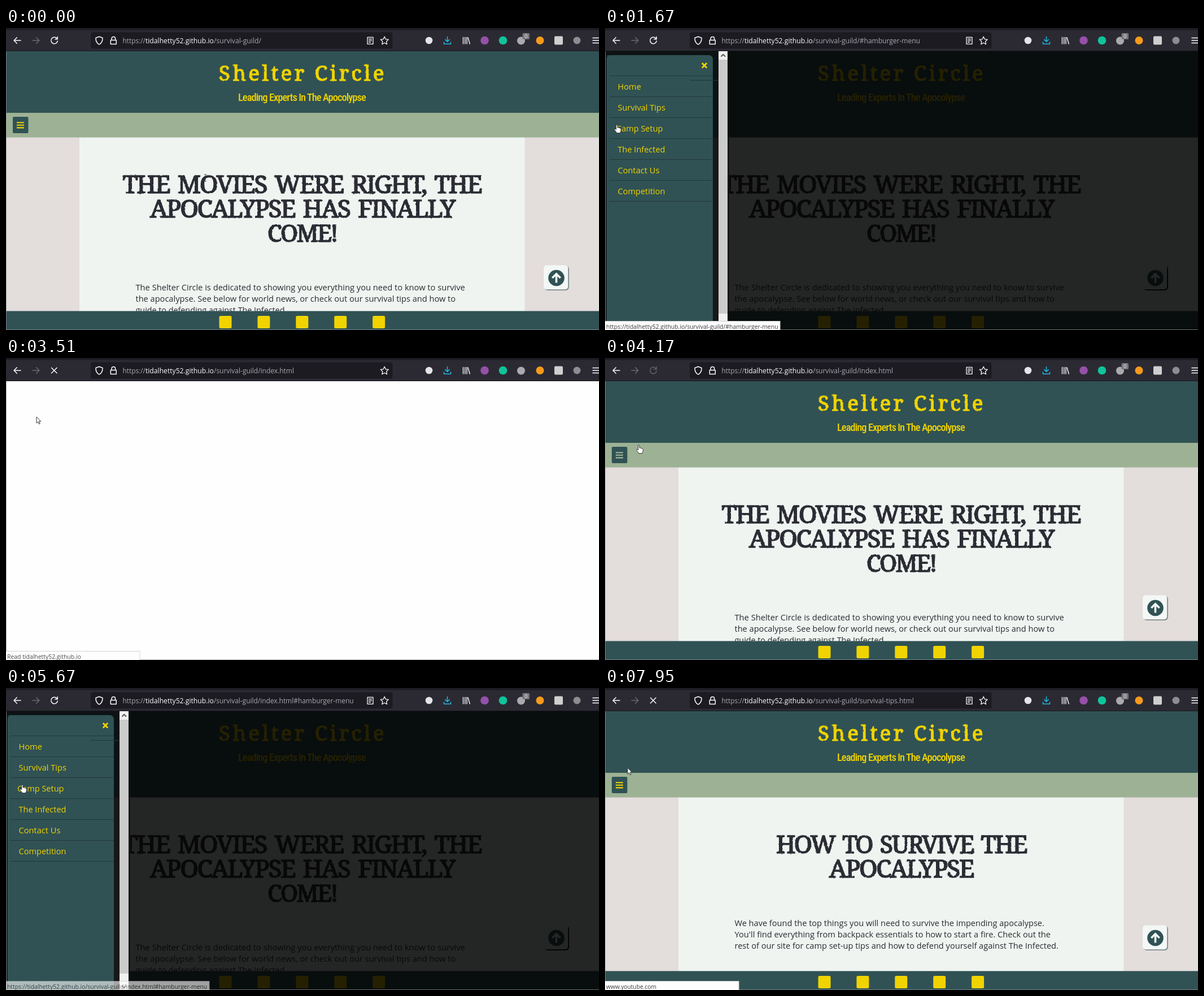
An HTML page that plays this animation: 1050x534 px, repeating every 8 s.

```html
<!DOCTYPE html>
<html lang="en">
<head>
<meta charset="utf-8">
<title>Shelter Circle</title>
<style>
html,body{margin:0;width:100%;height:100%;overflow:hidden;background:#fff}
svg{display:block;width:1050px;height:534px}
text{font-family:"Open Sans","Noto Sans",sans-serif;white-space:pre}
.slab{font-family:"Noto Serif","Liberation Serif",serif;font-weight:400;word-spacing:5px;stroke-width:1.7;stroke-linejoin:round}
.title{word-spacing:0;stroke-width:1.4}
.narrow{font-family:"Roboto Condensed",Roboto,sans-serif;font-stretch:75%;font-weight:500}
.line{fill:none;stroke:#fbfbfe;stroke-width:1.5;stroke-linecap:round;stroke-linejoin:round}
</style>
</head>
<body>
<svg id="stage" viewBox="0 0 1050 534" xmlns="http://www.w3.org/2000/svg">
  <defs>
    <filter id="rough" x="-5%" y="-10%" width="110%" height="120%" color-interpolation-filters="sRGB">
      <feTurbulence type="fractalNoise" baseFrequency=".25" numOctaves="2" seed="4"/>
      <feDisplacementMap in="SourceGraphic" scale="2.4" xChannelSelector="R" yChannelSelector="G"/>
    </filter>
    <linearGradient id="edge">
      <stop offset="0" stop-color="#0b1415"/><stop offset="1" stop-color="#305254"/>
    </linearGradient>
  </defs>
  <rect y="40" width="1050" height="494" fill="#fefefe"/>
  <g id="page">
    <rect id="sides" y="193" width="1050" height="308" fill="#e3dddb"/>
    <rect x="130" y="193" width="788.5" height="308" fill="#eff4f1"/>
    <rect id="nav" y="150" width="1050" height="43.5" fill="#9db294"/>
    <rect y="40.500" width="1050" height="109.5" fill="#305254"/>
    <g id="banner" fill="#f0d300" stroke="#f0d300" stroke-width="0"></g>
    <g id="burger">
      <rect x="12" y="157" width="27.5" height="29" rx="2" fill="#305254"/>
      <path id="bars" d="M19 167.2h13M19 171.800h13M19 176.4h13" stroke-width="2.1"/>
    </g>
    <g id="home"></g>
    <g id="tips"></g>
    <rect y="500.5" width="1050" height="33.5" fill="#305254"/>
    <g id="social" fill="#f0d300"></g>
    <g id="toTop">
      <rect id="topRim" x="953.5" y="420.5" width="43.5" height="43.5" rx="6"/>
      <rect id="topFace" x="952" y="419.5" width="43.2" height="42.8" rx="5"/>
      <circle cx="974.5" cy="442" r="14.3" fill="#305254"/>
      <path d="M974.5 450.5v-14M967.3 442l7.2-7.2 7.2 7.2" fill="none" stroke="#f3f7f5" stroke-width="3.6"/>
    </g>
  </g>
  <g id="menu">
    <rect y="41" width="1050" height="493" fill="#020202" fill-opacity=".85"/>
    <rect y="41" width="201" height="493" fill="#0d1314"/>
    <rect x="191" y="194" width="10" height="340" fill="#181818"/>
    <rect x="217" y="194" width="3" height="307" fill="#161616"/>
    <rect id="shade" y="48" width="9" height="486" fill="url(#edge)"/>
    <rect id="panel" y="48" height="500" fill="#305254"/>
    <path d="M150 92.5h51" stroke="#1f3638"/>
    <path id="rules" stroke="#25393b"/>
    <path d="M171.8 62l8.4 8.4M180.2 62l-8.4 8.4" stroke="#f0d300" stroke-width="2.8"/>
    <g id="items" fill="#f0d300"></g>
    <rect x="201" y="41" width="16" height="493" fill="#f1f1f1"/>
    <rect x="201" y="56" width="16" height="449" fill="#cbcbcb"/>
    <path d="M205.5 50.5l3.7-3.7 3.7 3.7M205.5 526.5l3.7 3.7 3.7-3.7" fill="none" stroke="#505050" stroke-width="1.8"/>
  </g>
  <path d="M.5 40v494M0 533.5h1050" stroke="#8d9294" stroke-opacity=".75"/>
  <g id="status"></g>
  <g id="chrome">
    <rect width="1050" height="40.5" fill="#2b2a33"/>
    <rect width="1050" height="3.5" fill="#1c1b22"/>
    <path d="M0 40.5h1050" stroke="#16151b"/>
    <rect x="150" y="7.5" width="534.5" height="29" rx="4" fill="#1c1b22"/>
    <g class="line">
      <path d="M26 22H14.3M19.3 16.8l-5.2 5.2 5.2 5.2"/>
      <path d="M47 22h11.7M53.7 16.8l5.2 5.2-5.2 5.2" stroke="#6a6972"/>
      <path id="reload" d="M90.4 18.8a5.8 5.8 0 1 0 .9 4.2M91.2 15.6v4.2h-4.2"/>
      <path id="stop" d="M80.5 17.2l9.6 9.6M90.1 17.2l-9.6 9.6"/>
      <path d="M165 15.3l6 2.2c.2 5.8-1.5 9.3-6 11.6-4.5-2.3-6.2-5.8-6-11.6z"/>
      <path d="M185.3 21.5h10v7h-10zM187 21.3v-2.6a3.3 3.3 0 0 1 6.6 0v2.6"/>
      <path id="reader" d="M640 16.3h10v12h-10zM642.5 19.5h5M642.5 22.3h5M642.5 25h3" stroke-width="1.3"/>
      <path d="M670.2 15.3l2.1 4.5 4.9.6-3.6 3.4.9 4.9-4.3-2.4-4.3 2.4.9-4.9-3.6-3.4 4.9-.6z" stroke-width="1.3"/>
      <path d="M781.5 15.5v8.5M777.8 20.6l3.7 3.7 3.7-3.7M775.5 25v3.2h12V25" stroke="#20b8e0"/>
      <path d="M809.5 16.5v11.5M812.8 16.5v11.5M816 16.5v11.5M818 17l3.2 11" stroke-width="1.4"/>
      <path d="M1039 17.5h14M1039 22h14M1039 26.5h14"/>
    </g>
    <circle cx="749" cy="22" r="6.3" fill="#e4e4e9"/>
    <circle cx="847.5" cy="22" r="7.3" fill="#9550a8"/>
    <circle cx="880" cy="22" r="7.3" fill="#10c39a"/>
    <circle cx="912" cy="22.5" r="7" fill="#a9a9ae"/>
    <circle cx="945.5" cy="22" r="7" fill="#f79a1c"/>
    <rect x="971" y="14.5" width="15" height="15" rx="2" fill="#cfcfcf"/>
    <circle cx="1011" cy="22" r="6.5" fill="#8c8c91"/>
    <g id="badge"><rect x="914.5" y="9" width="12.5" height="11" rx="2" fill="#76767c"/></g>
    <g id="url"></g>
  </g>
  <g id="beam"><path d="M-2-6h4M0-6v12M-2 6h4" stroke="#333" fill="none" stroke-width=".8"/></g>
  <g id="arrow"><path d="M0 0v11.2l2.6-2.4 1.8 4 1.8-.8-1.8-3.9h3.3z" fill="#fff" stroke="#222" stroke-width=".9"/></g>
  <g id="hand"><path d="M-1.3 1.2c0-1.6 2.4-1.6 2.4 0v4c1-.7 2-.4 2.3.4 1-.5 1.9-.1 2.1.7 1-.3 1.8.2 1.8 1.2v3.2c0 1.6-1.2 2.4-1.4 4H-.2c-.4-1.9-3.4-4.2-4-6-.3-1 .8-1.7 1.7-1l1.2 1.1z" fill="#fff" stroke="#222" stroke-width=".9"/></g>
</svg>
<script>
const $ = id => document.getElementById(id);
const NS = 'http://www.w3.org/2000/svg';
const LOOP = 8000, YELLOW = '#f0d300', INK = '#2c2c34';
const host = 'tidalhetty52.github.io', path = '/survival-guild/';

function add(parent, tag, attrs, label) {
  const el = document.createElementNS(NS, tag);
  for (const k in attrs) el.setAttribute(k, attrs[k]);
  if (label) el.textContent = label;
  return parent.appendChild(el);
}

// Picks the type size for a line; with `tight` the tracking adapts first.
function write(parent, label, x, y, width, attrs = {}, size = 14.5, tight = 0) {
  const el = add(parent, 'text', { x, y, 'font-size': size, ...attrs }, label);
  const n = label.length, len = el.getComputedTextLength();
  const k = tight ? Math.min(1, width / (len - n * tight * size)) : width / len;
  el.setAttribute('font-size', size * k);
  if (tight) el.style.letterSpacing = (width - len * k) / n + 'px';
  return el;
}
const show = (el, on) => el.setAttribute('visibility', on ? 'visible' : 'hidden');

// Page texts
write($('banner'), 'Shelter Circle', 377, 93, 297, { class: 'slab title', filter: 'url(#rough)' }, 37, .05);
write($('banner'), 'Leading Experts In The Apocolypse', 411, 129, 226, { class: 'narrow' }, 21, .05);
const head = (id, label, x, y, w) =>
  write($(id), label, x, y, w, { class: 'slab', fill: INK, stroke: INK, filter: 'url(#rough)' }, 44, .06);
const body = (id, label, y, w) => write($(id), label, 229.5, y, w, { fill: '#2b2c30' });
head('home', 'THE MOVIES WERE RIGHT, THE', 206.5, 291.5, 635);
head('home', 'APOCALYPSE HAS FINALLY', 255, 334.5, 539);
head('home', 'COME!', 463, 377.5, 123);
body('home', 'The Shelter Circle is dedicated to showing you everything you need to know to survive', 464, 584);
body('home', 'the apocalypse. See below for world news, or check out our survival tips and how to', 484, 567);
body('home', 'guide to defending against The Infected.', 504, 268);
head('tips', 'HOW TO SURVIVE THE', 303, 291.5, 443);
head('tips', 'APOCALYPSE', 397, 334.5, 255);
body('tips', 'We have found the top things you will need to survive the impending apocalypse.', 421, 549);
body('tips', "You'll find everything from backpack essentials to how to start a fire. Check out the", 441, 560);
body('tips', 'rest of our site for camp set-up tips and how to defend yourself against The Infected.', 461, 574);
for (let i = 0; i < 5; i++)
  add($('social'), 'rect', { x: 377.5 + i * 67.9, y: 509, width: 22, height: 22, rx: 2.5 });

// Side menu
const items = [['Home', 41.5], ['Survival Tips', 84.5], ['Camp Setup', 82.5], ['The Infected', 84], ['Contact Us', 74], ['Competition', 84]]
  .map(([label, w], i) => write($('items'), label, 22.5, 109 + i * 37, w));
$('rules').setAttribute('d', [...Array(7)].map((_, i) => `M8 ${84.5 + i * 37}H191`).join(''));

// Address bar and link preview
write($('url'), 'https://', 206.5, 27, 40.5, { fill: '#a9a9b0' }, 13);
write($('url'), host, 247, 27, 121, { fill: '#fbfbfe' }, 13);
const tails = [['', 84], ['#hamburger-menu', 190], ['index.html', 142], ['index.html#hamburger-menu', 248], ['survival-tips.html', 179]]
  .map(([page, w]) => write($('url'), path + page, 368, 27, w, { fill: '#a9a9b0' }, 13));
add($('badge'), 'text', { x: 918, y: 18, 'font-size': 9.5, fill: '#fff' }, '0');

const site = 'https://' + host + path;
const hints = [
  [site + '#hamburger-menu', 305, 311], [site + 'index.html', 263, 269.5],
  [site + 'index.html#hamburger-menu', 355, 361], [site + 'survival-tips.html', 300, 306],
  ['Read ' + host, 131, 238], ['www.youtube.com', 89, 238]
].map(([label, w, box]) => {
  const g = add($('status'), 'g', {});
  add(g, 'rect', { x: -1, y: 518.5, width: box, height: 17, fill: '#fefefe', stroke: '#cfcfcf' });
  write(g, label, 2, 532, w, { fill: '#3a3a3e' }, 11);
  return g;
});

// Bursts of screen updates: first, last, count
const bursts = [[120, 1090, 8], [1240, 1390, 2], [1670, 2710, 9], [3090, 4020, 8],
  [4170, 5100, 8], [5670, 6700, 8], [6850, 7690, 8], [7950, 7950, 1]];
function snap(t) {
  let s = 0;
  for (const [a, b, n] of bursts) if (t >= a) {
    const d = (b - a) / (n - 1) || 1;
    s = a + Math.floor((Math.min(t, b) - a) / d + 1e-6) * d;
  }
  return s + .5;
}

// Link preview: start, hint, opacity
const preview = [[0, -1, 0], [1240, 0, .6], [1390, 0, 1], [1930, -1, 0], [2450, 1, 1], [3480, 4, .9], [3880, -1, 0],
  [4960, 2, .6], [5100, 2, 1], [5670, 2, .62], [5800, -1, 0], [6540, 3, 1], [7090, 4, .9], [7950, 5, 1]];
// Pointer moves: start, end, from, to
const moves = [[0, 1090, 353, 265, 21, 171], [1670, 2710, 21, 171, 54, 104],
  [3480, 4170, 54, 104, 60, 154], [4170, 4960, 60, 154, 29, 171], [5670, 6700, 29, 171, 40, 141]];
const last = (list, t) => list.filter(r => r[0] <= t).pop();

function pointer(t) {
  const [a, b, x0, y0, x1, y1] = last(moves, t);
  const p = Math.min(1, (t - a) / (b - a)), e = p * p * (3 - 2 * p);
  return [x0 + (x1 - x0) * e, y0 + (y1 - y0) * e];
}

function draw(now) {
  const t = snap(now % LOOP);
  const open = t >= 1670 && t < 3480 || t >= 5670 && t < 7080;
  const blank = t >= 3480 && t < 3750 || t >= 7080 && t < 7440;
  const tips = t >= 7440;
  const fresh = t >= 1670 && t < 1790 || t >= 5670 && t < 5800;
  const settling = t >= 3750 && t < 4290 || tips && t < 7900;

  show($('page'), !blank);
  for (const id of ['home', 'tips']) $(id).setAttribute('display', blank || (id === 'tips') !== tips ? 'none' : 'inline');
  show($('menu'), open);
  $('nav').setAttribute('fill', open ? '#305254' : '#9db294');
  $('sides').setAttribute('fill', open ? '#eff4f1' : '#e3dddb');
  $('topFace').setAttribute('fill', open ? '#eff4f1' : '#f3f7f5');
  $('topRim').setAttribute('fill', open ? '#000' : '#7c8c8c');
  $('bars').setAttribute('stroke', settling ? '#a5b69a' : YELLOW);
  $('panel').setAttribute('x', fresh ? 3 : 8);
  $('panel').setAttribute('width', fresh ? 188 : 183);
  $('panel').setAttribute('rx', fresh ? 7 : 0);

  const loading = blank || tips;
  show($('stop'), loading);
  show($('reload'), !loading);
  $('reload').setAttribute('stroke', t >= 3750 && t < 4290 ? '#64636c' : '#fbfbfe');
  show($('reader'), !blank);
  show($('badge'), !blank);
  const tail = t < 1670 ? 0 : t < 3480 ? 1 : t < 5670 ? 2 : t < 7080 ? 3 : 4;
  tails.forEach((el, i) => show(el, i === tail));

  const [, hint, alpha] = last(preview, t);
  hints.forEach((g, i) => { show(g, i === hint); g.setAttribute('opacity', alpha); });

  const [x, y] = pointer(t);
  const row = Math.floor((y - 84.5) / 37);
  items.forEach((el, i) => el.setAttribute('x', i === row ? 20 : 22.5));
  const shape = t < 1080 ? (x > 205 && y > 225 ? 'beam' : 'arrow')
    : t >= 4290 && t < 4820 || blank || tips ? 'arrow' : 'hand';
  for (const id of ['beam', 'arrow', 'hand']) {
    show($(id), id === shape);
    $(id).setAttribute('transform', `translate(${x.toFixed(1)} ${y.toFixed(1)})`);
  }
}

function tick() {
  draw(performance.now());
  requestAnimationFrame(tick);
}
tick();
</script>
</body>
</html>
```
